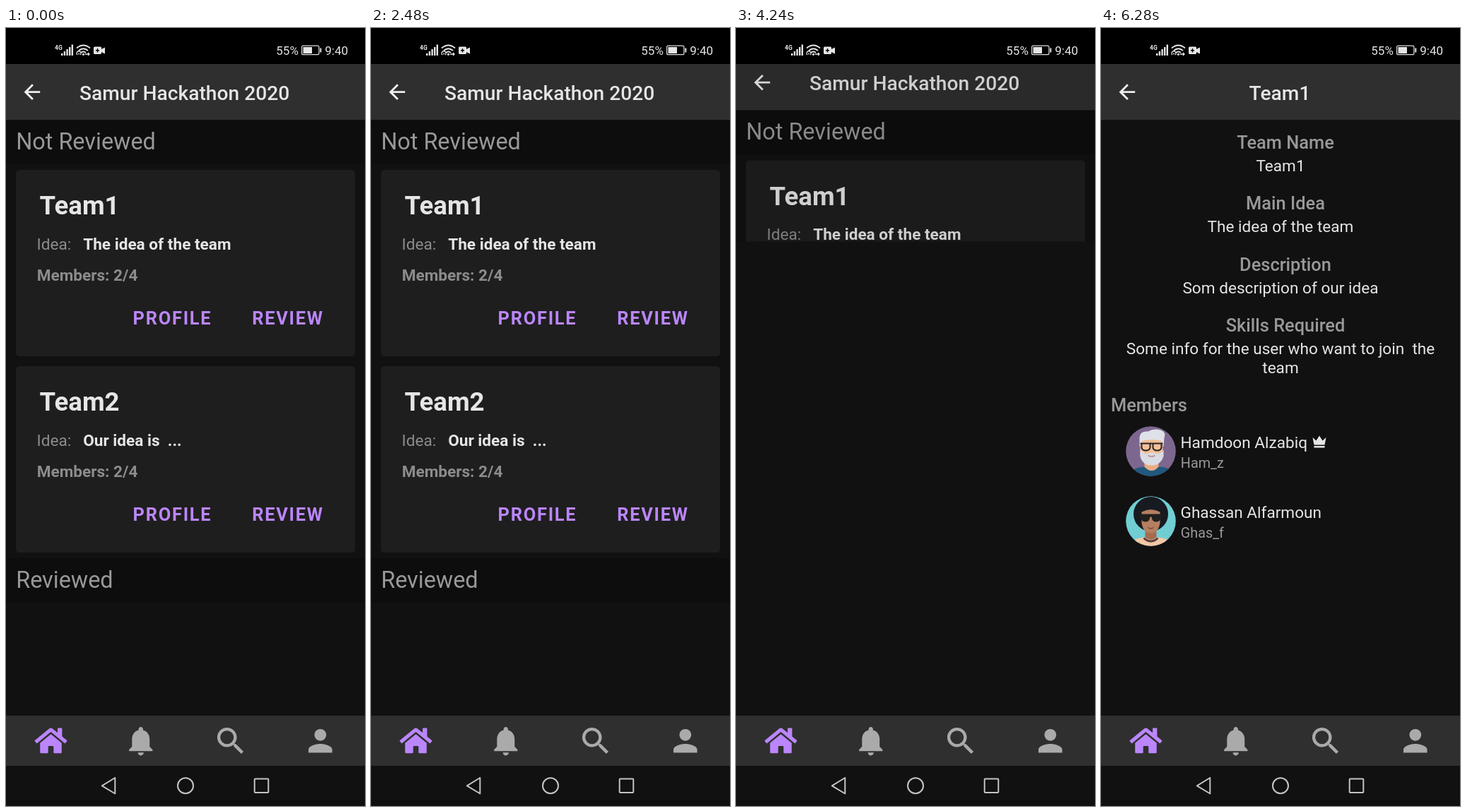
An HTML page that plays this animation: 508 px wide and 1102 px high, repeating every 6.68 s.

```html
<!DOCTYPE html>
<html lang="en">
<head>
<meta charset="utf-8">
<title>Team review app</title>
<style>
  html, body { margin: 0; width: 100%; height: 100%; overflow: hidden; background: #000; }
  svg { display: block; width: 100%; height: 100%; }
  text { font-family: Roboto, sans-serif; font-size: 22.6px; fill: #e6e6e6; white-space: pre; }
  .title { font-size: 28.2px; font-weight: 500; }
  .section { font-size: 32.4px; fill: #999; }
  .team { font-size: 36.6px; font-weight: 700; }
  .bold { font-weight: 700; }
  .grey { fill: #8c8c8c; }
  .button { font-size: 25.4px; font-weight: 700; letter-spacing: 1.75px; fill: #bb86fc; }
  .label { font-size: 25.4px; font-weight: 500; fill: #999; }
  .user { font-size: 19.8px; fill: #999; }
  .status { font-size: 17px; }
  .mid { text-anchor: middle; }
</style>
</head>
<body>
<svg viewBox="0 0 508 1102">
  <defs>
    <clipPath id="reveal"><rect id="revealBox" width="508" height="923"/></clipPath>
    <clipPath id="buttonShape"><rect x="163" y="388" width="144" height="46" rx="6"/></clipPath>
    <clipPath id="face"><circle r="35.3"/></clipPath>
    <radialGradient id="touchFill">
      <stop offset="0" stop-color="#c6c6c6" stop-opacity=".82"/>
      <stop offset=".62" stop-color="#a6a6a6" stop-opacity=".82"/>
      <stop offset=".72" stop-color="#e4e4e4" stop-opacity=".85"/>
      <stop offset=".8" stop-color="#aaa" stop-opacity=".4"/>
      <stop offset="1" stop-color="#888" stop-opacity="0"/>
    </radialGradient>
    <path id="back" transform="translate(20 73.7) scale(1.411)" fill="#eee"
      d="M20 11H7.83l5.59-5.59L12 4l-8 8 8 8 1.41-1.41L7.83 13H20z"/>
  </defs>

  <rect width="508" height="1102" fill="#111"/>
  <g id="listScreen"></g>
  <g clip-path="url(#reveal)"><g id="detailScreen"></g></g>

  <!-- status bar -->
  <rect width="508" height="51"/>
  <g fill="#e6e6e6">
    <text x="69" y="31" style="font-size:8.5px;font-weight:700">4G</text>
    <path d="M78 36h2.4v3h-2.4zM81.7 33h2.4v6h-2.4zM85.4 30h2.4v9h-2.4zM89 27h2.4v12h-2.4zM92.6 23.5h2.4v15.5h-2.4z"/>
    <g fill="none" stroke="#e6e6e6" stroke-width="1.8">
      <path d="M100 28.5q9.5-8 19 0M103 32q6.5-5.5 13 0M106 35q3.5-3 7 0"/>
      <path stroke-width="1.3" d="M101 38a3 3 0 1 1 4 0M112 37h6M116 35l2 2-2 2"/>
    </g>
    <circle cx="109.5" cy="37.3" r="1.6"/><circle cx="103" cy="36.5" r="1"/>
    <path d="M125.5 26.5h8q1.5 0 1.5 1.5v2l5-2.5v9l-5-2.5v1.5q0 1.5-1.5 1.5h-8q-1.5 0-1.5-1.5v-7.500q0-1.5 1.5-1.5z"/>
    <path d="M129.500 29v5.500M127 31.8h5" stroke="#000" stroke-width="1.4"/>
    <text class="status" x="382.3" y="38">55%</text>
    <rect x="418.6" y="25.1" width="24.3" height="12.6" rx="2" fill="none" stroke="#ddd" stroke-width="1.2"/>
    <path d="M420.5 27h12.5v9h-12.5zM444.3 28.5h2v6h-2z"/>
    <text class="status" x="451.3" y="38">9:40</text>
  </g>

  <!-- tab bar -->
  <rect y="974" width="508" height="71" fill="#2f2f2f"/>
  <path fill="#bb86fc" transform="translate(40.6 989) scale(.0795)"
    d="M280 148L96 300V464a16 16 0 0 0 16 16H224a16 16 0 0 0 16-16V368a16 16 0 0 1 16-16h64a16 16 0 0 1 16 16v96a16 16 0 0 0 16 16H464a16 16 0 0 0 16-16V300L296 148a12 12 0 0 0-16 0zM572 251L488 182V44a12 12 0 0 0-12-12h-56a12 12 0 0 0-12 12v73L318 43a48 48 0 0 0-61 0L4 251a12 12 0 0 0-1 17l25 31a12 12 0 0 0 17 2L280 107a12 12 0 0 1 16 0L531 301a12 12 0 0 0 17-2l25-31a12 12 0 0 0-1-17z"/>
  <g fill="#aaa">
    <path transform="translate(165.8 984.7) scale(2.08)" d="M12 22c1.1 0 2-.9 2-2h-4a2 2 0 0 0 2 2zm6-6v-5c0-3.07-1.64-5.64-4.5-6.32V4c0-.83-.67-1.5-1.5-1.5s-1.5.67-1.5 1.5v.68C7.63 5.36 6 7.92 6 11v5l-2 2v1h16v-1z"/>
    <path transform="translate(292.6 984.6) scale(2.12)" d="M15.5 14h-.79l-.28-.27A6.5 6.5 0 1 0 9.5 16c1.61 0 3.09-.59 4.23-1.57l.27.28v.79l5 4.99L20.49 19zm-6 0a4.5 4.5 0 1 1 0-9 4.5 4.5 0 0 1 0 9z"/>
    <path transform="translate(419.6 984.5) scale(2.1)" d="M12 12a4 4 0 1 0 0-8 4 4 0 0 0 0 8zm0 2c-2.67 0-8 1.34-8 4v2h16v-2c0-2.66-5.33-4-8-4z"/>
  </g>

  <!-- system navigation -->
  <rect y="1045" width="508" height="57" fill="#111"/>
  <g fill="none" stroke="#c4c4c4" stroke-width="2" stroke-linejoin="round">
    <path d="M154.3 1062v22.5l-18.5-11.2z"/>
    <circle cx="254" cy="1073.2" r="11"/>
    <rect x="351.7" y="1063.5" width="19.6" height="19.6" rx="1"/>
  </g>
  <circle id="touch" cx="261.7" cy="423" r="21" fill="url(#touchFill)"/>
</svg>

<script>
const LOOP = 6680, STEP = 40;
const TOUCH = [3840, 3960], OPEN = 4119, OPEN_MS = 425, SPIN = 4148, LOADED = 4480;
const TOP = 51, HEIGHT = 923;
const $ = id => document.getElementById(id);
const set = (id, attrs) => {
  for (const name in attrs) $(id).setAttribute(name, attrs[name]);
};
const clamp = v => Math.min(1, Math.max(0, v));

const text = (cls, x, y, str) => `<text class="${cls}" x="${x}" y="${y}">${str}</text>`;
const rect = (x, y, w, h, fill, rx = 0) =>
  `<rect x="${x}" y="${y}" width="${w}" height="${h}" rx="${rx}" fill="${fill}"/>`;
const header = rect(0, TOP, 508, 79, '#2f2f2f') + '<use href="#back"/>';

const section = (y, name) => rect(0, y, 508, 63, '#0d0d0d') + text('section', 14.2, y + 41.5, name);

const card = (y, name, idea) => `<g transform="translate(0 ${y})">` +
  rect(14, 0, 480, 264, '#1e1e1e', 5) +
  text('team', 47.5, 63.3, name) +
  text('grey', 43.6, 112.5, 'Idea:') + text('bold', 109.2, 112.5, idea) +
  text('bold grey', 43.7, 157, 'Members: 2/4') +
  text('button', 179.6, 219, 'PROFILE') + text('button', 348.2, 219, 'REVIEW') + '</g>';

const field = (y, name, ...lines) => text('label mid', 261, y, name) +
  lines.map((line, i) => text('mid', 254, y + 32 + i * 27, line)).join('');

const avatar = (y, shapes) =>
  `<g transform="translate(70.5 ${y})"><g clip-path="url(#face)">${shapes}</g></g>`;

const greyHairMan = rect(-36, -36, 72, 72, '#7d678f') + `
  <path d="M-36 36Q-27 23-10 22h24q16 1 22 14z" fill="#22587f"/>
  <path d="M-9 12H11V22Q1 33-9 22z" fill="#e8ad83"/>
  <path d="M-15-18H17V6Q15 18 1 18T-15 6z" fill="#f2c097"/>
  <path d="M-15-2Q-11 3-7 4 1 0 10 4q5-1 8-6V7Q14 20 1 20T-15 7z" fill="#d9dce5"/>
  <path d="M-4 6q5 3 10 0" fill="none" stroke="#b98d7c" stroke-width="1.5"/>
  <path d="M-16-6V-20Q-15-29-4-28 4-33 14-30q8 3 5 11l-1 13-3-9q-14-3-27 0z" fill="#dfe1e8"/>
  <path d="M-15-11H17M-13-11h12v6q-1 4-6 4t-6-4zM3-11h12v6q-1 4-6 4t-6-4z" fill="none" stroke="#282326" stroke-width="2"/>`;

const afroWoman = rect(-36, -36, 72, 72, '#70ced3') + `
  <ellipse cy="-10" rx="24.5" ry="24.5" fill="#171b21"/>
  <path d="M-36 36Q-25 24-10 23h20q17 1 26 13z" fill="#f4c7a4"/>
  <path d="M-8 10H8V23Q0 30-8 23z" fill="#a56b4f"/>
  <path d="M-10 24Q0 33 10 24" fill="none" stroke="#523b39" stroke-width="3"/>
  <path d="M-13-13Q0-20 13-13V2Q11 17 0 17T-13 2z" fill="#b67e60"/>
  <path d="M-15-10H15V-5Q13 1 7 1 2 1 1-6H-1Q-2 1-7 1-13 1-15-5z" fill="#20201f"/>
  <path d="M-4 9q4 3 8 0" fill="none" stroke="#70443a" stroke-width="1.5"/>`;

$('listScreen').innerHTML = rect(0, TOP, 508, HEIGHT + 30, '#111') + header +
  text('title', 104, 101.5, 'Samur Hackathon 2020') +
  section(130, 'Not Reviewed') +
  card(201, 'Team1', 'The idea of the team') +
  card(479, 'Team2', 'Our idea is  ...') +
  section(751, 'Reviewed') +
  '<circle id="ripple" cx="262" cy="423" fill="#bb86fc" clip-path="url(#buttonShape)"/>' +
  '<rect id="shade" y="30" width="508" height="990"/>';

$('detailScreen').innerHTML = rect(0, TOP, 508, HEIGHT, '#111') + header +
  '<circle id="spinner" r="19.5" pathLength="360" fill="none" stroke="#bb86fc" stroke-width="4"/>' +
  '<g id="details">' +
  text('title mid', 253, 101.5, 'Team1') +
  field(171, 'Team Name', 'Team1') +
  field(257.3, 'Main Idea', 'The idea of the team') +
  field(343.6, 'Description', 'Som description of our idea') +
  field(429.8, 'Skills Required', 'Some info for the user who want to join  the', 'team') +
  text('label', 14, 543, 'Members') +
  text('', 112.5, 595, 'Hamdoon Alzabiq') + text('user', 112.8, 622.5, 'Ham_z') +
  text('', 112.5, 694, 'Ghassan Alfarmoun') + text('user', 112.8, 721.5, 'Ghas_f') +
  '<path fill="#e6e6e6" d="M299.5 580l5 4.5 4.5-7 4.5 7 5-4.5-2 10.5h-15zM301.5 592h15v2.5h-15z"/>' +
  '<g id="avatars">' + avatar(599.5, greyHairMan) + avatar(698.5, afroWoman) + '</g></g>';

// Cubic Bezier easing, solved by bisection.
function bezier(x1, y1, x2, y2) {
  const at = (s, a, b) => 3 * (1 - s) ** 2 * s * a + 3 * (1 - s) * s * s * b + s ** 3;
  return x => {
    let low = 0, high = 1;
    for (let i = 0; i < 24; i++) {
      const s = (low + high) / 2;
      if (at(s, x1, x2) < x) low = s; else high = s;
    }
    return at(low, y1, y2);
  };
}
const openEase = bezier(.35, .45, 0, 1);
const spinEase = bezier(.4, 0, .2, 1);

function draw(t) {
  const p = t < OPEN ? 0 : t >= OPEN + OPEN_MS ? 1 : openEase((t - OPEN) / OPEN_MS);
  set('listScreen', { transform: `translate(0 ${-.02 * HEIGHT * p})` });
  set('shade', { opacity: .1 * clamp(p / .36) });
  set('revealBox', { y: TOP + HEIGHT * (1 - p) });
  set('detailScreen', { transform: `translate(0 ${.041 * HEIGHT * (1 - p)})` });

  set('touch', { opacity: +(t >= TOUCH[0] && t < TOUCH[1]) });
  const pressed = t - TOUCH[0];
  set('ripple', {
    r: 110 * clamp(pressed / 240),
    opacity: pressed > 0 ? .18 * clamp((400 - pressed) / 200) : 0
  });

  const spun = Math.max(0, t - SPIN);
  const sweep = 300 * spinEase(clamp(spun / 666));
  set('spinner', {
    transform: `translate(254 191.5) rotate(${-90 + .2295 * spun})`,
    'stroke-dasharray': `${sweep} ${360 - sweep}`,
    opacity: +(t < LOADED)
  });
  set('details', { opacity: +(t >= LOADED) });
  set('avatars', { opacity: clamp((t - LOADED) / 300) });
}

function frame() {
  const t = performance.now() % LOOP;
  draw(Math.floor(t / STEP) * STEP);
  requestAnimationFrame(frame);
}
frame();
</script>
</body>
</html>
```
